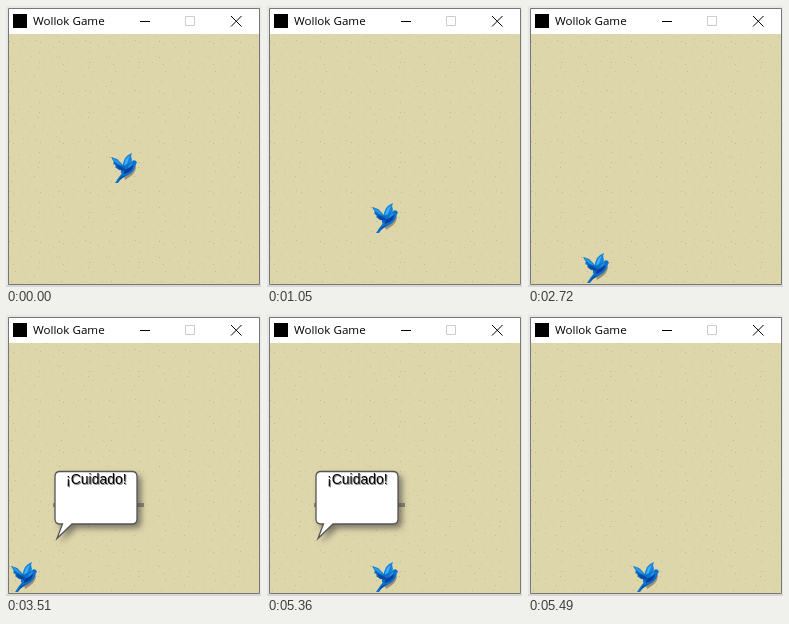
Recreate the animation shown at these times as an HTML page with a canvas. Size 255 by 281 pixels, loop 6.42 s.

```html
<!DOCTYPE html>
<html lang="es">
<head>
<meta charset="utf-8">
<title>Wollok Game</title>
<style>
html, body { margin: 0; width: 100%; height: 100%; overflow: hidden; background: #fff; }
canvas { display: block; }
</style>
</head>
<body>
<canvas id="stage" width="255" height="281"></canvas>
<script>
const ctx = document.getElementById('stage').getContext('2d');
const LOOP = 6420, CELL = 50, LEFT = 3, TOP = 28;

// Each step: start time, column, row of the bird
const steps = [
  [0, 2, 2], [1050, 2, 3], [1910, 2, 4], [2720, 1, 4],
  [3510, 0, 4], [4500, 1, 4], [5360, 2, 4]
];
const speech = { from: 3510, to: 5490 };

function makeGround() {
  const tile = document.createElement('canvas');
  tile.width = tile.height = CELL;
  const g = tile.getContext('2d');
  let seed = 91;
  const rnd = n => {
    seed = (seed * 16807) % 2147483647;
    return Math.floor(seed / 2147483647 * n);
  };
  g.fillStyle = '#ded6ab';
  g.fillRect(0, 0, CELL, CELL);
  for (let i = 0; i < 36; i++) {
    g.fillStyle = i % 3 ? '#d3c696' : '#c9b583';
    g.fillRect(i % 6 * 8 + rnd(8), (i / 6 | 0) * 8 + rnd(8), 1, 1);
  }
  return ctx.createPattern(tile, 'repeat');
}
const ground = makeGround();

function shape(path, fill) {
  ctx.fillStyle = fill;
  ctx.fill(new Path2D(path));
}

function line(path, color) {
  ctx.strokeStyle = color;
  ctx.lineWidth = 1;
  ctx.stroke(new Path2D(path));
}

function drawWindow() {
  ctx.fillStyle = '#e6e6e6';
  ctx.fillRect(0, 0, 255, 281);
  ctx.fillStyle = '#d6d6d6';
  ctx.fillRect(0, 279, 255, 2);
  ctx.fillStyle = '#fff';
  ctx.fillRect(3, 3, 250, 25);
  ctx.fillStyle = '#000';
  ctx.fillRect(7, 8, 14, 14);
  ctx.font = '11.6px "Open Sans", "Noto Sans", sans-serif';
  ctx.fillText('Wollok Game', 27, 19);
  line('M134 15.5H144', '#000');
  line('M179.5 10.5h9v9h-9z', '#ccc');
  line('M225 10l10.5 10.5M235.5 10l-10.5 10.5', '#000');
  ctx.save();
  ctx.translate(LEFT, TOP);
  ctx.fillStyle = ground;
  ctx.fillRect(0, 0, 250, 250);
  ctx.restore();
  line('M2.5 2.5h251v276h-251z', '#777');
}

function drawBird(col, row) {
  ctx.save();
  ctx.translate(LEFT + col * CELL + 2, TOP + row * CELL + 18);
  // Soft shadow under the body
  shape('M25 14Q25 20 20 24L14 28L13 24L21 18Z', 'rgba(110,85,65,.55)');
  // Far wing
  shape('M12 15L12 11L14 6L17 3L21 1L20 4L21 8L19 12L16 16Z', '#1583dc');
  shape('M13 13L15 7L19 3L17 9L15 14Z', '#3fb0f3');
  // Tail
  shape('M12 20L8 25L4 31L7 31L10 27L17 23Z', '#0a72cb');
  shape('M10 25L7 29L10 27L15 23Z', '#084799');
  // Body and head
  shape('M10 17L14 13L19 11Q22 7 25 9L26 11L25 12Q24 18 19 22Q14 25 10 21Z', '#0d70cd');
  shape('M13 18Q18 17 22 13Q22 17 18 20L13 22Z', '#073f9b');
  // Near wing
  shape('M0 5L6 7L10 11L14 15L14 19L8 18L4 15L5 14L2 11L3 10Z', '#0868c6');
  shape('M1 5L6 8L12 14L7 12L3 9Z', '#229be8');
  shape('M5 13L9 14L14 17L13 19L8 17Z', '#07479b');
  shape('M18 13L22 10L21 13L17 16Z', '#2292e2');
  ctx.restore();
}

function drawSpeech() {
  const balloon = new Path2D('M54 156.5H126Q131 156.5 131 161.5V204Q131 209 126 209H66L51 223.5L56.5 209H54Q49 209 49 204V161.5Q49 156.5 54 156.5Z');
  ctx.fillStyle = 'rgba(90,90,85,.6)';
  ctx.fillRect(47, 188, 91, 4);
  ctx.save();
  ctx.shadowColor = 'rgba(50,50,50,.6)';
  ctx.shadowBlur = 6;
  ctx.shadowOffsetX = ctx.shadowOffsetY = 4;
  ctx.fillStyle = '#fff';
  ctx.fill(balloon);
  ctx.restore();
  ctx.strokeStyle = '#555';
  ctx.lineWidth = 1.3;
  ctx.stroke(balloon);
  ctx.font = '14px "Liberation Sans", Arial, sans-serif';
  ctx.fillStyle = '#888';
  ctx.fillText('¡Cuidado!', 61, 170);
  ctx.fillStyle = '#000';
  ctx.fillText('¡Cuidado!', 60, 169);
}

function draw() {
  const t = performance.now() % LOOP;
  const [, col, row] = steps.findLast(s => s[0] <= t);
  drawWindow();
  drawBird(col, row);
  if (t >= speech.from && t < speech.to) drawSpeech();
  requestAnimationFrame(draw);
}
draw();
</script>
</body>
</html>
```
